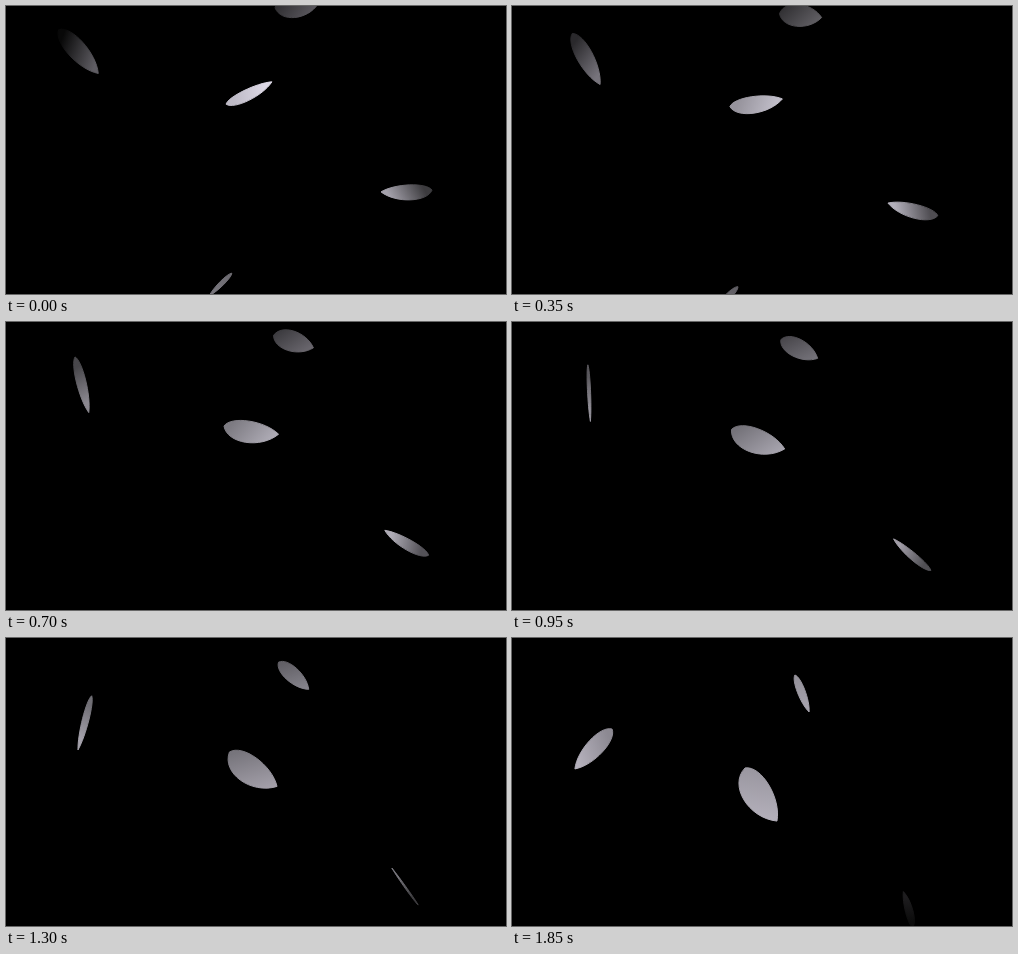
An HTML page with a canvas for the animation above (1.9 s loop, 500 by 288 pixels).

```html
<!DOCTYPE html>
<html>
<head>
<meta charset="utf-8">
<title>Falling petals</title>
<style>
html, body { margin: 0; width: 100%; height: 100%; overflow: hidden; background: #000; }
canvas { display: block; }
</style>
</head>
<body>
<canvas id="stage" width="500" height="288"></canvas>
<script>
const ctx = document.getElementById('stage').getContext('2d');
const LOOP = 1900, STEP = 50;

// Each motion is [from, to, bend] over one loop; a bend slows the first half.
// x, y: centre; angle: base to tip; flip: roll about the long axis (degrees).
// lean shifts the width to one side; dark and light are the shades across it.
const petals = [
  { x: [72.5, 81.5], y: [45.5, 111, 32], angle: [48, 133, 17], flip: [180, 337],
    length: [59, 54.5], width: 9.3, lean: 0, dark: [8, 140, -60], light: [95, 180, -50] },
  { x: [290.5, 290, 12], y: [0, 55.5, 6], angle: [-5, 69, 24], flip: [0, 70],
    length: [43, 39.6], width: 11.3, lean: 0, dark: [45, 150, 100], light: [90, 165, 50] },
  { x: [243, 249], y: [87, 156.5, 22], angle: [-26, 59, -10], flip: [-68, 0],
    length: [51, 62], width: 14.5, lean: 0.2, dark: [190, 155, 220], light: [220, 180, 130] },
  { x: [400.5, 396, -8], y: [185, 271.5, -13], angle: [178, 255.5, -10], flip: [180, 300],
    length: [51, 37, -20], width: 7.5, lean: 0.2, dark: [60, 12, -180], light: [165, 30, -260] },
  { x: [214.5, 215], y: [278.5, 350], angle: [135, 135], flip: [-60, 0],
    length: [32, 32], width: 4.5, lean: 0, dark: [110, 40], light: [120, 50] }
];

const glide = ([from, to, bend = 0], s) => from + (to - from) * s - bend * s * (1 - s);
const radians = degrees => degrees * Math.PI / 180;
const tint = grey => `rgb(${grey},${grey * 0.98},${grey * 1.04})`;

function drawPetal(petal, s) {
  const get = key => glide(petal[key], s);
  const x = get('x'), y = get('y'), length = get('length');
  const angle = radians(get('angle'));
  const cos = Math.cos(angle), sin = Math.sin(angle);
  const half = petal.width * Math.cos(radians(get('flip')));
  const up = half * (1 - petal.lean), down = -half * (1 + petal.lean);
  const at = (along, side) => [
    x + cos * length * (along - 0.5) + sin * side,
    y + sin * length * (along - 0.5) - cos * side
  ];

  const shade = ctx.createLinearGradient(...at(0.2, up), ...at(0.8, down));
  shade.addColorStop(0, tint(get('dark')));
  shade.addColorStop(1, tint(get('light')));

  // A cubic reaches 3/4 of its control height: blunt base, pointed tip.
  const u = up / 0.75, d = down / 0.75;
  ctx.beginPath();
  ctx.moveTo(...at(0, 0));
  ctx.bezierCurveTo(...at(0.1, u), ...at(0.72, u), ...at(1, 0));
  ctx.bezierCurveTo(...at(0.72, d), ...at(0.1, d), ...at(0, 0));
  ctx.fillStyle = ctx.strokeStyle = shade;
  ctx.fill();
  ctx.stroke();
}

const start = performance.now();
function frame() {
  const t = Math.floor((performance.now() - start) % LOOP / STEP) * STEP;
  ctx.filter = 'none';
  ctx.fillStyle = '#000';
  ctx.fillRect(0, 0, 500, 288);
  ctx.filter = 'blur(0.6px)';
  ctx.lineJoin = 'round';
  for (const petal of petals) drawPetal(petal, t / (LOOP - STEP));
  requestAnimationFrame(frame);
}
frame();
</script>
</body>
</html>
```
